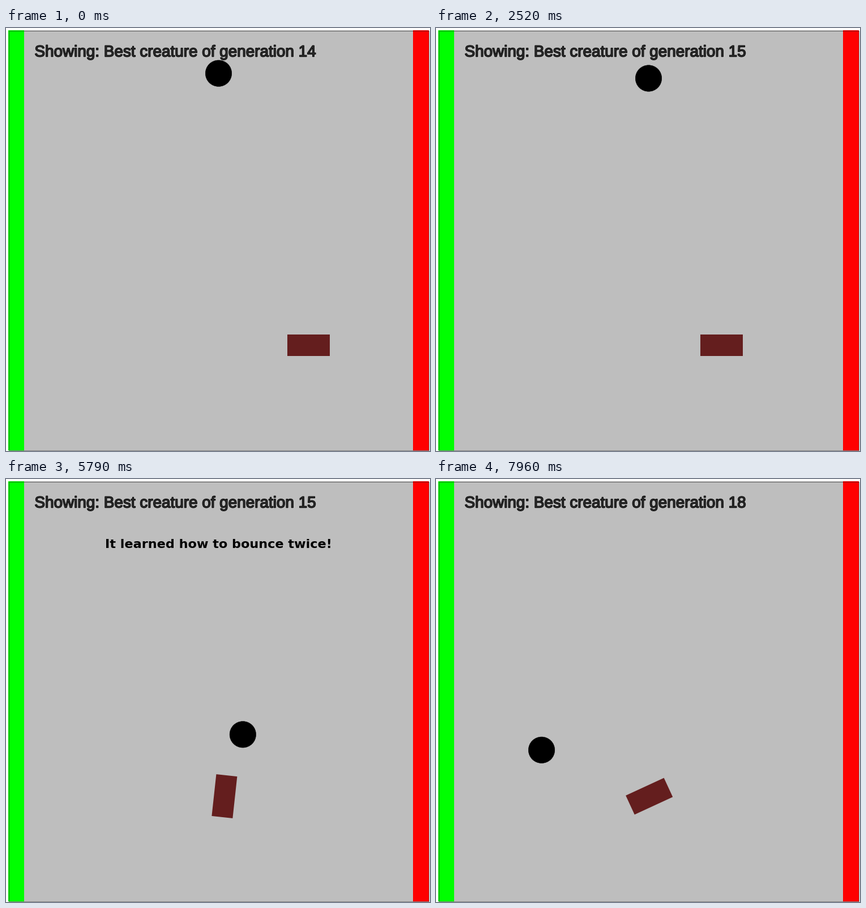
Write a matplotlib script that moves like this. It is 749 by 748 pixels and loops after 7990 ms.

```python
import numpy as np
import matplotlib.pyplot as plt
import matplotlib.patheffects as pe
from matplotlib.animation import FuncAnimation
from matplotlib.patches import Circle, Polygon, Rectangle

W, H, DPI = 749, 748, 100
STEP, FRAMES = 34, 235

# The arena is 800 units wide, scaled to fit the stage.
LEFT, TOP, SIDE = 4, 4, 743
UNIT = SIDE / 800
WALL = 30 * UNIT
RADIUS = 25 * UNIT
HALF_L, HALF_T = 40 * UNIT, 20 * UNIT
PADDLE_Y = 561
DROP_X, DROP_Y, DROP = 375.5, 79, 440
BOUNCE_X = 56                          # ball centre when it touches the left wall
END_X, FLOOR_Y = 695.5, 723
G = 1.13                               # gravity, px per tick squared
PADDLE_SPEED = 9.9                     # px per tick

# start: release tick; hits: (tick, vx, vy) off the paddle; tilt: (tick, degrees)
RUNS = [
    dict(gen=14, start=-1.46, stop=385.9,
         hits=[(26.45, -23.13, -16), (54, 26.8, 10.7)],
         tilt=[(13, 0), (27, 28.9), (44, 12.4), (54, -28)]),
    dict(gen=15, start=67.5, stop=385.9,
         hits=[(97.4, -26.3, -11.7), (121, -21.27, -17.2), (149.5, 3.6, -13.3)],
         tilt=[(80, 0), (98, 34.5), (100, 24.8), (121.5, 62), (139.4, 20.6),
               (165.4, 83.8)]),
    dict(gen=18, start=186.6, stop=376.7,
         hits=[(214.12, -25.17, -11.5)],
         tilt=[(194, 0), (204, 8.2), (215.5, 51), (232, 24.8)]),
]


def clock(frame):
    """Simulation tick and time in ms; the picture updates in 70 ms steps at first."""
    t = frame * STEP + STEP - 1
    if t < 6560:
        lag = 20 if t > 4800 else 0
        t = (t + lag) // 70 * 70 - lag
    else:
        t = min(frame * STEP + 10, 7960)
    tick = np.interp(t, [0, 6560, 6710, 7120, 7960],
                     [0, 187.43, 192.4, 204, 232])
    return tick, t


def fly(x, y, vx, vy, n):
    """Free flight for n ticks; the left wall turns vx and stops vy."""
    touch = (x - BOUNCE_X) / -vx if vx < 0 else np.inf
    if n > touch:
        y += vy * touch + G * touch ** 2 / 2
        x, vx, vy, n = BOUNCE_X, -vx, 0, n - touch
    return x + vx * n, y + vy * n + G * n ** 2 / 2


def ball_at(run, tick):
    hits = run["hits"]
    fall = (tick - run["start"]) / (hits[0][0] - run["start"])
    x, y = DROP_X, DROP_Y + DROP * min(fall, 1) ** 2
    ends = [h[0] for h in hits[1:]] + [np.inf]
    for (begin, vx, vy), end in zip(hits, ends):
        if tick > begin:
            x, y = fly(x, y, vx, vy, min(tick, end) - begin)
    return min(x, END_X), min(y, FLOOR_Y)


def paddle_corners(x, degrees):
    a = np.radians(degrees)
    along = np.array([np.cos(a), -np.sin(a)]) * HALF_L
    across = np.array([np.sin(a), np.cos(a)]) * HALF_T
    mid = np.array([x, PADDLE_Y])
    return [mid + s * along + r * across
            for s, r in ((-1, -1), (1, -1), (1, 1), (-1, 1))]


fig = plt.figure(figsize=(W / DPI, H / DPI), dpi=DPI, facecolor="white")
ax = fig.add_axes([0, 0, 1, 1])
ax.set_xlim(0, W)
ax.set_ylim(H, 0)
ax.axis("off")


def panel(x, width, color):
    ax.add_patch(Rectangle((x, TOP), width, SIDE, fc=color, lw=0))


panel(LEFT, SIDE, "#bebebe")
panel(LEFT, WALL, "#00ff00")
panel(LEFT + SIDE - WALL, WALL, "#ff0000")
ax.add_patch(Rectangle((LEFT + 0.5, TOP + 0.5), SIDE - 1, SIDE - 1, fill=False,
                       ec="black", alpha=0.5, lw=0.72))

title = ax.text(LEFT + 50 * UNIT, TOP + 50 * UNIT, "", family="Liberation Sans",
                fontsize=30 * UNIT * 0.72, color="#2a2a2a", va="baseline", zorder=3)
title.set_path_effects([pe.Stroke(linewidth=1.1, foreground="black"), pe.Normal()])
note = ax.text(375, 122, "It learned how to bounce twice!", family="DejaVu Sans",
               weight="bold", fontsize=22.4 * 0.72, color="black",
               ha="center", va="baseline", zorder=3)
paddle = ax.add_patch(Polygon(paddle_corners(534, 0), closed=True,
                              fc="#641e1e", lw=0, zorder=4))
ball = ax.add_patch(Circle((DROP_X, DROP_Y), RADIUS, fc="black", ec="black",
                           lw=0.4, zorder=5))


def draw(frame):
    tick, t = clock(frame)
    run = [r for r in RUNS if tick >= r["start"]][-1]
    ball.center = ball_at(run, tick)
    x = max(run["stop"], 549 - PADDLE_SPEED * (tick - run["start"]))
    paddle.set_xy(paddle_corners(x, np.interp(tick, *zip(*run["tilt"]))))
    title.set_text(f"Showing: Best creature of generation {run['gen']}")
    note.set_visible(5300 <= t < 6530)
    return title, note, paddle, ball


anim = FuncAnimation(fig, draw, frames=FRAMES, interval=STEP, repeat=True,
                     repeat_delay=0, blit=False)
plt.show()
```
